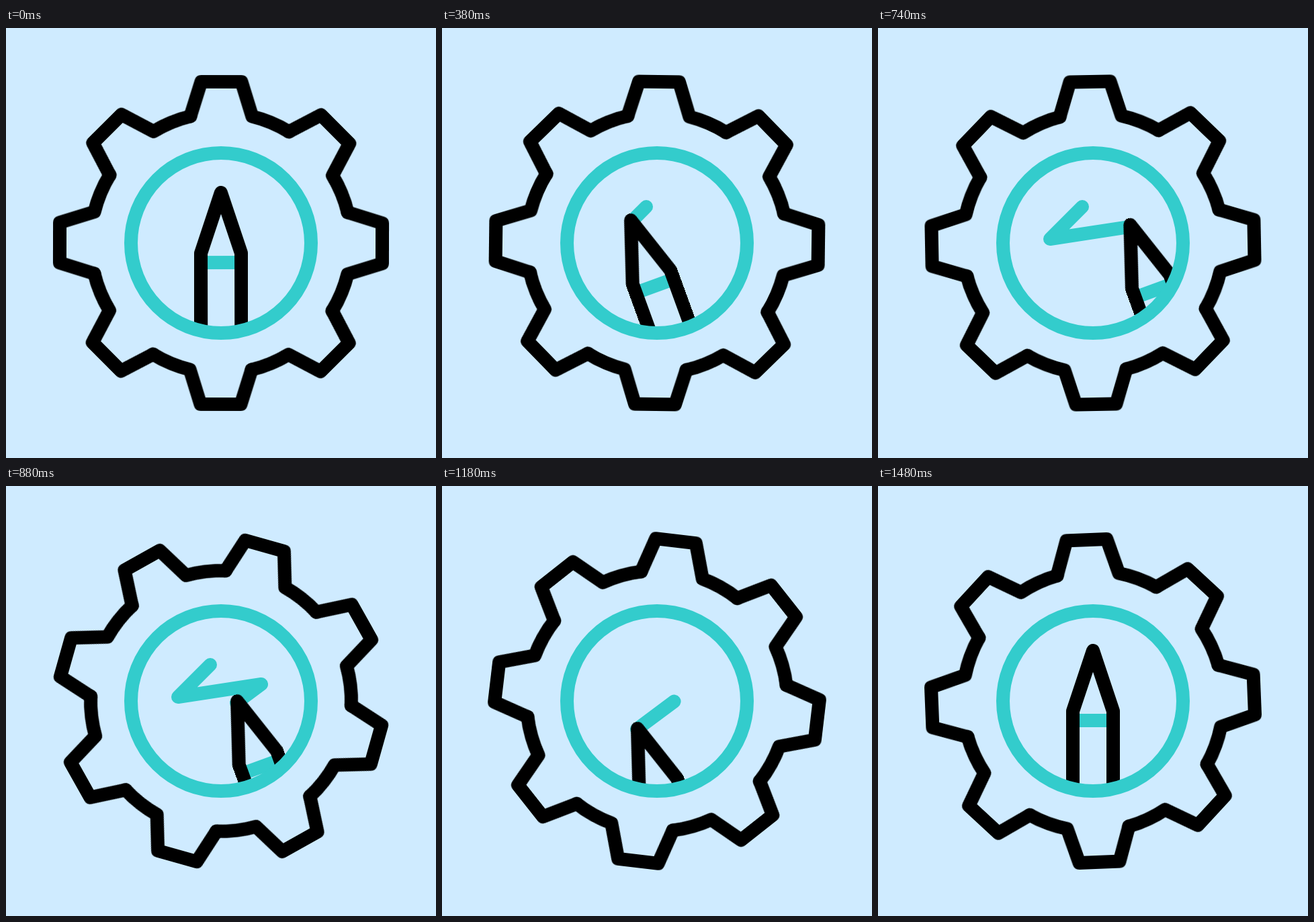
An HTML page that plays this animation: 640 px wide and 640 px high, repeating every 1500 ms.

```html
<!DOCTYPE html>
<html lang="en">
<head>
<meta charset="utf-8">
<title>Gear and pencil</title>
<style>
  html, body { margin: 0; width: 100%; height: 100%; overflow: hidden; background: #cfebff; }
  svg { display: block; width: 100vw; height: 100vh; }
  .line { fill: none; stroke: #000; stroke-width: 20; stroke-linecap: round; stroke-linejoin: round; }
  .teal { stroke: #33cccc; }
  .gear, .pencil, .trail { animation: 1.5s linear infinite; }
  .gear { animation-name: spin; }
  .pencil { animation-name: write; }
  .trail { animation-name: draw; }

  @keyframes spin {
    from { transform: translate(320px, 320px) rotate(0deg); }
    to { transform: translate(320px, 320px) rotate(180deg); }
  }
  @keyframes write {
    0%, 98.667%, 100% { transform: translate(320px, 245px) rotate(0deg); }
    14.667%, 16% { transform: translate(302px, 263px) rotate(-20deg); }
    36.667% { transform: translate(256px, 314px) rotate(-20deg); }
    50% { transform: translate(381px, 292px) rotate(-20deg); }
    71.333%, 82.667% { transform: translate(291px, 361px) rotate(-20deg); }
  }
  /* the dash grows to the pencil tip, then its tail catches up */
  @keyframes draw {
    0%, 15.99% { stroke-dasharray: 0 200; stroke-dashoffset: 0; opacity: 0; }
    16% { stroke-dasharray: 0 200; stroke-dashoffset: 0; opacity: 1; }
    36.667% { stroke-dasharray: 22.2 200; }
    50% { stroke-dasharray: 63.3 200; }
    65.333% { stroke-dasharray: 89.7 200; stroke-dashoffset: 0; }
    71.333% { stroke-dasharray: 65.4 200; stroke-dashoffset: -34.6; }
    82.66% { stroke-dasharray: 0 200; stroke-dashoffset: -100; opacity: 1; }
    82.667%, 100% { stroke-dasharray: 0 200; stroke-dashoffset: -100; opacity: 0; }
  }
</style>
</head>
<body>
<svg viewBox="0 0 640 640">
  <defs>
    <clipPath id="dial"><circle cx="320" cy="320" r="134"/></clipPath>
    <path id="tooth" d="M-46-188.5L-30-240H30L46-188.5A194 194 0 0 1 100.8-165.8"/>
    <g id="pair"><use href="#tooth"/><use href="#tooth" transform="rotate(45)"/></g>
  </defs>
  <g class="line gear">
    <use href="#pair"/>
    <use href="#pair" transform="rotate(90)"/>
    <use href="#pair" transform="rotate(180)"/>
    <use href="#pair" transform="rotate(270)"/>
  </g>
  <g clip-path="url(#dial)">
    <path class="line teal trail" pathLength="100" d="M304 266L256 314L380 295L290 362"/>
    <g class="pencil">
      <path class="line teal" d="M-25 104H25" style="stroke-linecap: butt"/>
      <path class="line" d="M-30 260V90L0 0L30 90V260"/>
    </g>
  </g>
  <circle class="line teal" cx="320" cy="320" r="134"/>
</svg>
</body>
</html>
```
